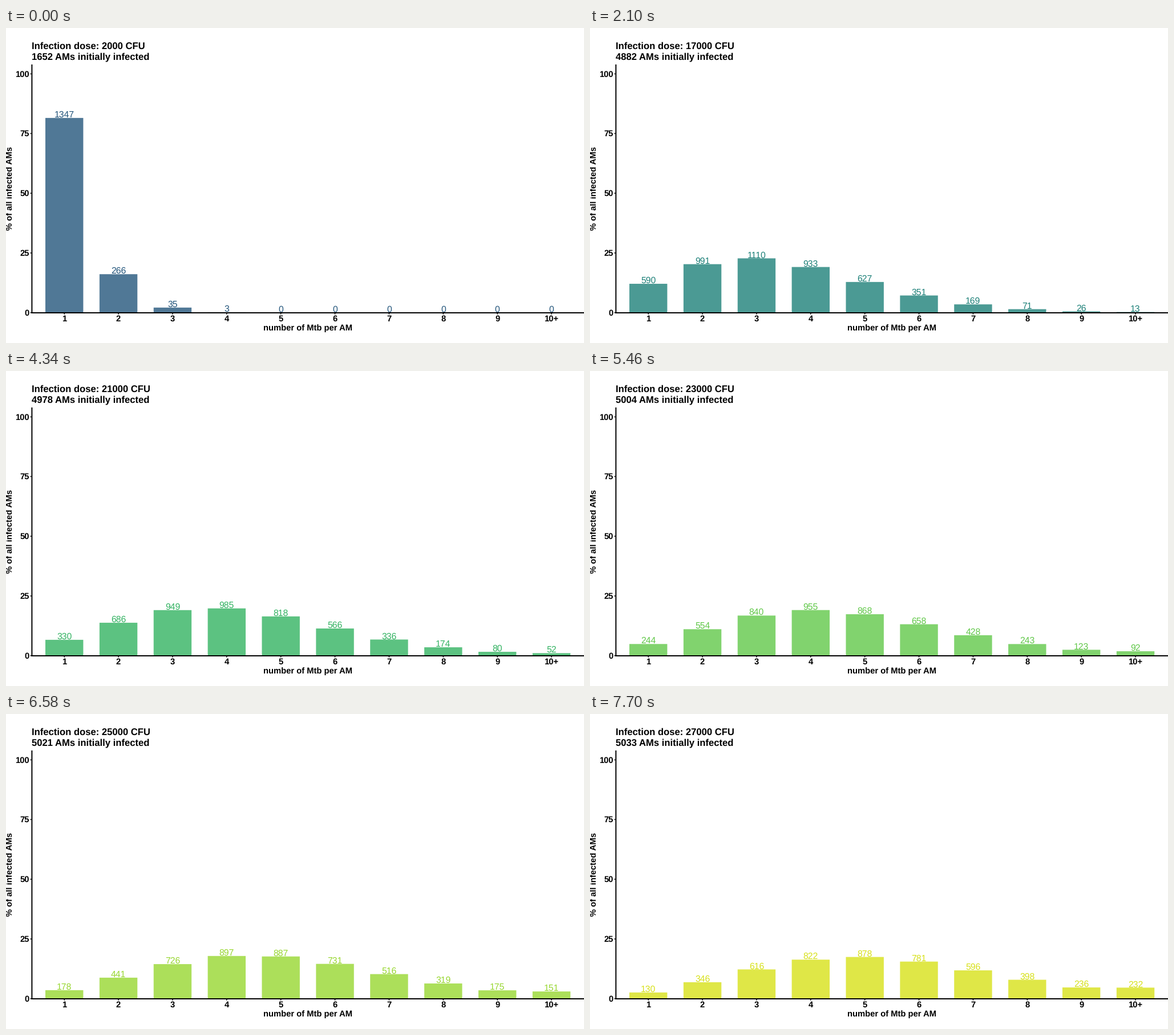
Animation, 1013 px wide and 553 px high, one loop 8000 ms. Source, as a matplotlib script:

```python
import math

import matplotlib.pyplot as plt
import numpy as np
from matplotlib.animation import FuncAnimation
from matplotlib.patches import Rectangle

W, H, DPI = 1013, 553, 64
STEP_MS, LOOP_MS = 20, 8000
HOLD_MS, HEAD_START_MS = 560, 140

MEAN_CELLS = 5057.1
DOSES = [2000, 4000, 8000] + list(range(16000, 28000, 1000))

# bar colour stops along the steps
STOPS = [0, 4, 8, 11, 14]
COLOURS = ["#507896", "#4b9a94", "#5cc281", "#93db64", "#dfe747"]
BAR_ALPHA = 0.8

AXIS_X, AXIS_Y = 45.4, 500
ZERO_Y, PX_PER_PERCENT = 499.7, 4.192
FIRST_X, PITCH = 102.2, 94.87
BAR_W = 0.7 * PITCH
TICK = 2.8


def counts(dose):
    """Cells holding 1, 2, ... 9, 10+ bacteria, and all infected cells."""
    lam = dose / MEAN_CELLS
    p = [math.exp(-lam) * lam**k / math.factorial(k) for k in range(1, 10)]
    infected = 1 - math.exp(-lam)
    p.append(infected - sum(p))
    return [round(MEAN_CELLS * q) for q in p], round(MEAN_CELLS * infected)


def colours(step):
    stops = np.array([plt.matplotlib.colors.to_rgb(c) for c in COLOURS])
    bar = np.array([np.interp(step, STOPS, channel) for channel in stops.T])
    text = np.clip((bar - (1 - BAR_ALPHA)) / BAR_ALPHA, 0, 1)
    return bar, text


STATES = [(dose, *counts(dose), *colours(i)) for i, dose in enumerate(DOSES)]

plt.rcParams["font.family"] = "Liberation Sans"
plt.rcParams["text.hinting"] = "none"

fig = plt.figure(figsize=(W / DPI, H / DPI), dpi=DPI, facecolor="white")
ax = fig.add_axes([0, 0, 1, 1])
ax.set_xlim(0, W)
ax.set_ylim(H, 0)
ax.axis("off")


def pt(px):
    return px * 72 / DPI


def label(x, y, text="", px=14.8, weight="bold", ha="center", **kw):
    return ax.text(x, y, text, fontsize=pt(px), weight=weight, ha=ha,
                   va="baseline", color="black", **kw)


def line(xs, ys, px=2):
    ax.plot(xs, ys, color="black", lw=pt(px), solid_capstyle="butt",
            snap=False, zorder=5)


centres = [FIRST_X + PITCH * i for i in range(10)]
bars = [ax.add_patch(Rectangle((x - BAR_W / 2, ZERO_Y), BAR_W, 0, lw=0, snap=False))
        for x in centres]
tallies = [label(x, ZERO_Y, px=15.8, weight="normal") for x in centres]
heading = [label(45, y, px=16.67, ha="left") for y in (37, 55)]

line([AXIS_X, AXIS_X], [64, AXIS_Y + 1])
line([AXIS_X - 1, W], [AXIS_Y, AXIS_Y])
for percent in range(0, 101, 25):
    y = ZERO_Y - percent * PX_PER_PERCENT
    line([AXIS_X - TICK, AXIS_X], [y, y], 1.5)
    label(40.5, y + 5, str(percent), ha="right")
for i, x in enumerate(centres):
    line([x, x], [AXIS_Y, AXIS_Y + TICK], 1.5)
    label(x, 514.6, "10+" if i == 9 else str(i + 1))
label(529, 531.3, "number of Mtb per AM")
label(12, 281.5, "% of all infected AMs", rotation=90, rotation_mode="anchor")


def draw(frame):
    step = (frame * STEP_MS + HEAD_START_MS) // HOLD_MS
    dose, values, total, bar_colour, text_colour = STATES[step]
    heading[0].set_text(f"Infection dose: {dose} CFU")
    heading[1].set_text(f"{total} AMs initially infected")
    for bar, tally, value in zip(bars, tallies, values):
        height = 100 * value / total * PX_PER_PERCENT
        bar.set_height(-height)
        bar.set_facecolor(bar_colour)
        tally.set_text(str(value))
        tally.set_y(ZERO_Y - height - 1)
        tally.set_color(text_colour)
    return bars + tallies + heading


anim = FuncAnimation(fig, draw, frames=LOOP_MS // STEP_MS, interval=STEP_MS,
                     repeat=True, repeat_delay=0)
plt.show()
```
